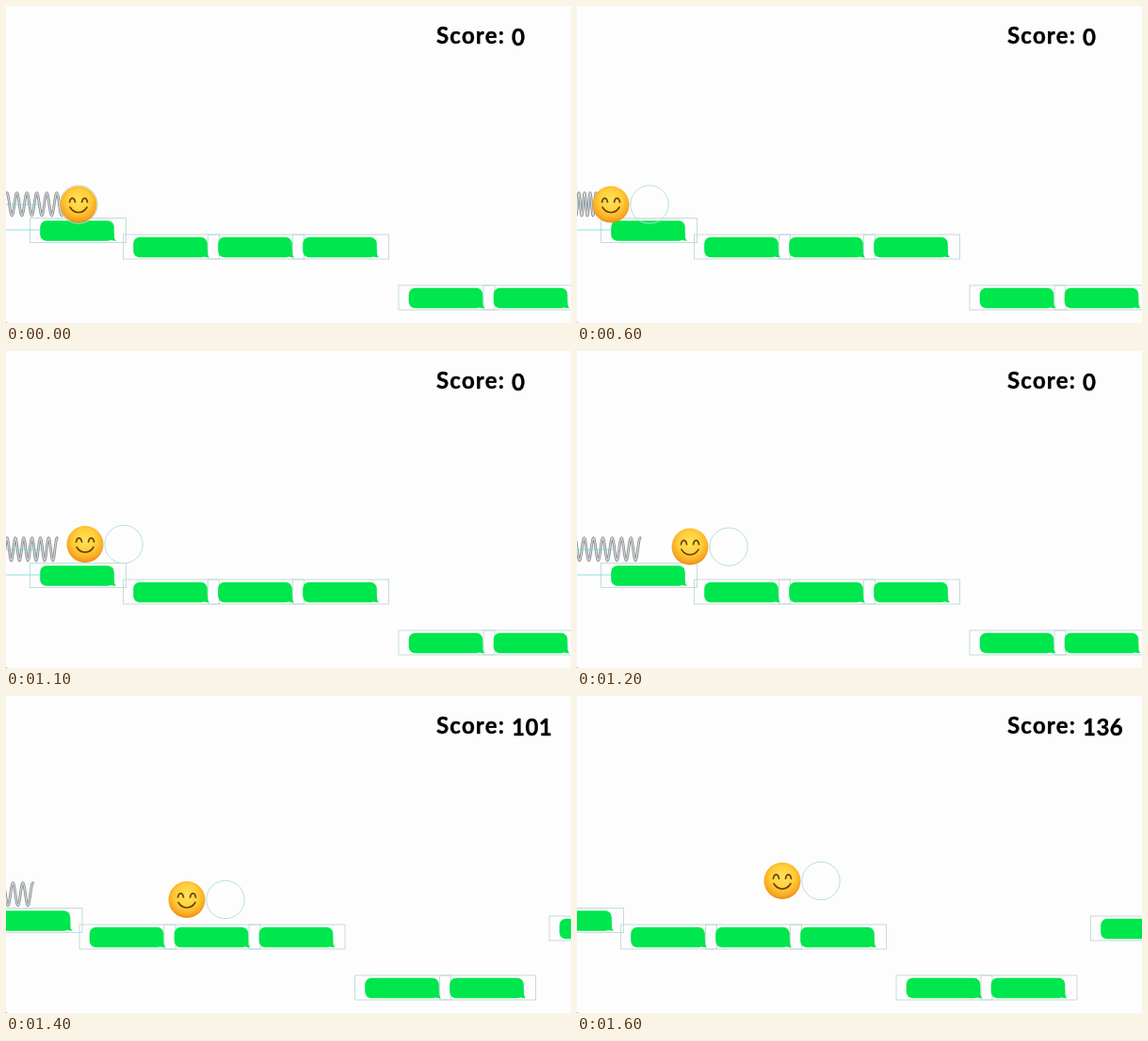
These frames come from a looping animation (600 px wide and 337 px high, 1700 ms). An HTML page:

```html
<!DOCTYPE html>
<html lang="en">
<head>
<meta charset="utf-8">
<title>Spring launch</title>
<style>
  html, body { margin: 0; width: 100%; height: 100%; overflow: hidden; background: #fefdfe; }
  svg { display: block; width: 100vw; height: 100vh; }
  text {
    font: 700 24px Lato, "Open Sans", sans-serif;
    letter-spacing: .5px;
    stroke: #000;
    stroke-width: .4;
    stroke-linejoin: round;
  }
  .label { letter-spacing: 1.2px; }
  .debug { fill: none; stroke: #c3dcdb; stroke-width: 1; }
  .coil { fill: none; stroke-linecap: round; stroke-linejoin: round; }
  .face { fill: none; stroke: #70400c; stroke-width: 1.7; stroke-linecap: round; }
  #ghost { stroke: #b4e0df; }
</style>
</head>
<body>
<svg viewBox="0 0 600 337">
  <defs>
    <radialGradient id="skin" cx=".5" cy=".4" r=".62">
      <stop offset="0" stop-color="#ffe25a"/>
      <stop offset=".5" stop-color="#ffcf3a"/>
      <stop offset=".82" stop-color="#f8a722"/>
      <stop offset="1" stop-color="#e58614"/>
    </radialGradient>
    <rect id="frame" class="debug" x=".5" y=".5" width="102" height="26"/>
    <g id="bubble" fill="#00e64d">
      <rect x="11.200" y="3.200" width="78.600" height="21.500" rx="6.800"/>
      <path d="M89.800 16Q89.500 23 92 24.800Q87 25 83 22Z"/>
    </g>
  </defs>

  <g id="world">
    <g id="frames"></g>
    <path class="coil" stroke="#85898b" stroke-width="2.800"/>
    <path class="coil" stroke="#d3d8d8" stroke-width="1.200"/>
    <path class="debug" style="stroke:#5fd3d3" opacity=".7" d="M-60 211H38M-60 238H38"/>
    <g id="bubbles"></g>
  </g>

  <circle id="ghost" class="debug" r="20.200"/>
  <g id="ball">
    <circle r="19.500" fill="url(#skin)"/>
    <path class="face" d="M-9.500-2.500C-8.500-8-4.500-8-3.500-2.500M3.500-2.500C4.500-8 8.500-8 9.500-2.500"/>
    <path class="face" d="M-9 3Q-5.500 8.500 0 8.500T9 3"/>
  </g>

  <text class="label" x="457" y="40">Score:</text>
  <text id="score" x="537" y="41.500">0</text>
  <rect y="336" width="1" height="1" fill="#999"/>
</svg>

<script>
const LOOP = 1700, STEP = 100;
const PULLED = 300, RELEASE = 900, RELAXED = 1300;
const REACH = 41; // how far the ball is pulled back
const GRAVITY = 1.81;

const $ = id => document.getElementById(id);
const coils = document.querySelectorAll('.coil');

// Rows of platforms: left, top, count
const rows = [[25, 225, 1], [124, 242.5, 3], [416.5, 296.5, 2], [623, 233.5, 1]];
for (const [left, top, count] of rows) {
  for (let i = 0; i < count; i++) {
    const use = id => `<use href="#${id}" x="${left + 90 * i}" y="${top}"/>`;
    $('frames').innerHTML += use('frame');
    $('bubbles').innerHTML += use('bubble');
  }
}

// Linear path through [time, value] points
function track(t, keys) {
  const i = keys.findIndex(k => k[0] >= t);
  if (i === 0) return keys[0][1];
  const [t0, v0] = keys[i - 1], [t1, v1] = keys[i];
  return v0 + (v1 - v0) * (t - t0) / (t1 - t0);
}

// How far the spring is compressed, 0 to 1
function compression(t) {
  if (t < RELEASE) return Math.min(1, t / PULLED);
  return Math.max(0, (RELAXED - t) / (RELAXED - RELEASE)) ** 1.4;
}

function ballX(t) {
  if (t < RELEASE) return 77 - REACH * compression(t);
  return track(t, [[900, 36], [1100, 84], [1400, 192], [1600, 218]]);
}

// The launch arc, then the arc after the bounce
function ballY(t) {
  const s = Math.max(0, t - RELEASE) / 100;
  const arc = (start, y, speed) => y + speed * (s - start) + GRAVITY * (s - start) ** 2;
  return Math.min(arc(0, 211, -6.4), arc(5, 216.5, -13.6));
}

const cameraX = t => track(t, [[1200, 0], [1300, 10.5], [1400, 46.5], [1600, 78]]);

function springPath(left, right) {
  const turns = 7, samples = 16 * turns;
  const points = [];
  for (let i = 0; i <= samples; i++) {
    const x = left + (right - left) * i / samples;
    const y = 210.7 - 12 * Math.cos(i / 16 * 2 * Math.PI);
    points.push(x.toFixed(2) + ' ' + y.toFixed(2));
  }
  return 'M' + points.join('L');
}

const move = (el, x, y) => el.setAttribute('transform', `translate(${x} ${y})`);

function draw() {
  const t = Math.floor(performance.now() % LOOP / STEP) * STEP;
  const x = ballX(t), y = ballY(t), camera = cameraX(t), squeeze = compression(t);
  move($('world'), -camera, 0);
  move($('ball'), x, y);
  move($('ghost'), x + REACH * Math.min(1, t / PULLED), y);
  const d = springPath(1 - 23 * squeeze, 75 - 55 * squeeze);
  coils.forEach(c => c.setAttribute('d', d));
  $('score').textContent = camera > 0 ? Math.floor(50 + 1.107 * camera) : 0;
  requestAnimationFrame(draw);
}
draw();
</script>
</body>
</html>
```
